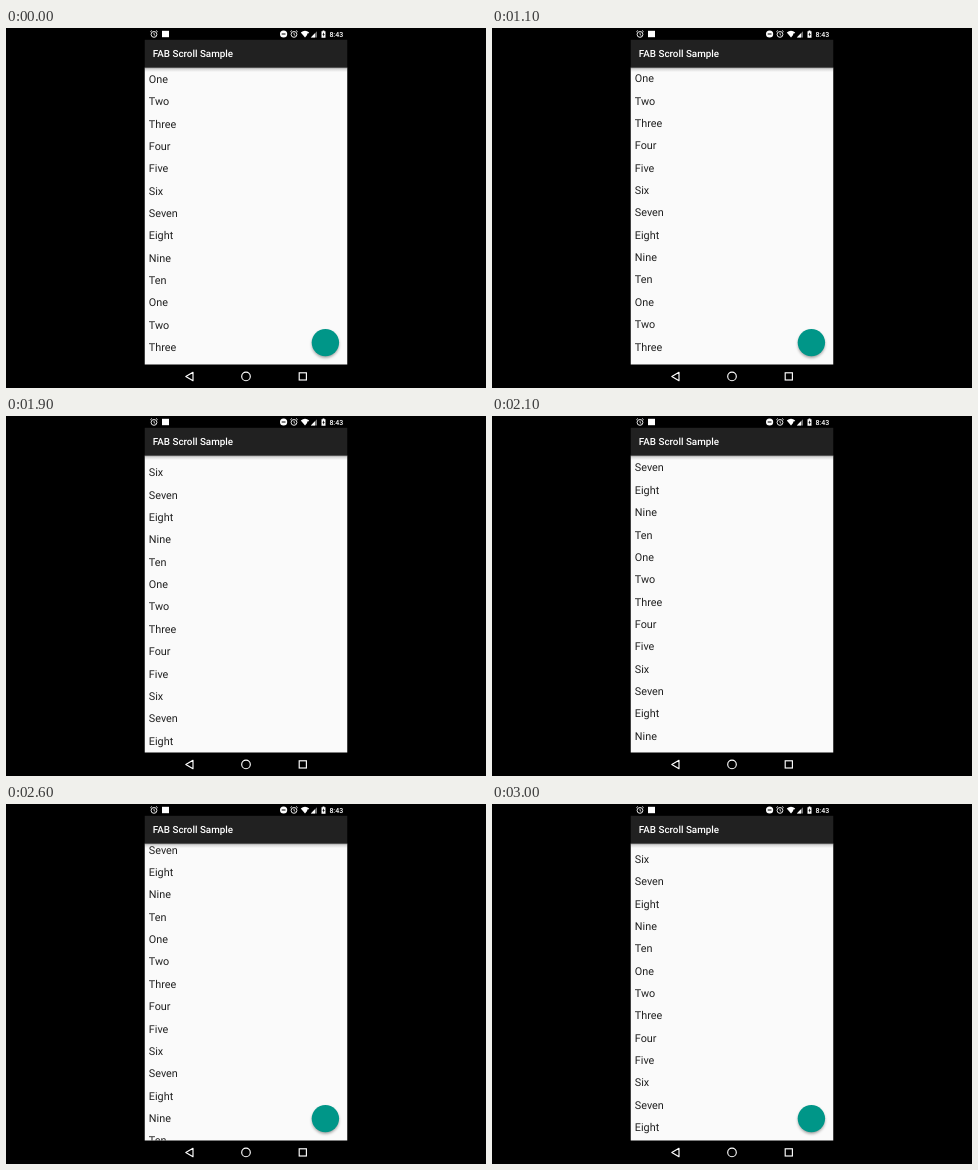
An HTML page for the animation above (3.1 s loop, 480 by 360 pixels).

```html
<!DOCTYPE html>
<html lang="en">
<head>
<meta charset="utf-8">
<title>FAB Scroll Sample</title>
<style>
  html, body { margin: 0; width: 100%; height: 100%; overflow: hidden; background: #000; }
  svg { display: block; width: 480px; height: 360px; }
  text { font-family: Roboto, sans-serif; text-rendering: geometricPrecision; }
  .bar { font-weight: 500; fill: #fff; }
  #rows { font-size: 10.83px; fill: #212121; }
  .line { fill: none; stroke: #fff; }
</style>
</head>
<body>
<svg viewBox="0 0 480 360">
  <defs>
    <clipPath id="view"><rect x="138.75" y="39.4" width="202.5" height="297"/></clipPath>
    <linearGradient id="shade" x2="0" y2="1">
      <stop offset="0" stop-opacity=".36"/>
      <stop offset=".4" stop-opacity=".13"/>
      <stop offset="1" stop-opacity="0"/>
    </linearGradient>
    <filter id="soft" x="-50%" y="-50%" width="200%" height="200%">
      <feGaussianBlur stdDeviation="1.7"/>
    </filter>
    <g id="alarm" class="line">
      <circle cy=".4" r="2.9" stroke-width=".9"/>
      <path d="M0 -1.2V.6L1.3 1.4M-3.7 -2.2L-2 -3.6M3.7 -2.2L2 -3.6" stroke-width=".8"/>
    </g>
  </defs>
  <rect width="480" height="360"/>
  <g clip-path="url(#view)">
    <rect x="138" y="39" width="204" height="298" fill="#fafafa"/>
    <g id="rows"></g>
    <rect x="138" y="39.4" width="204" height="4.6" fill="url(#shade)"/>
    <g id="fab">
      <circle cy="1.8" r="13.3" fill-opacity=".38" filter="url(#soft)"/>
      <circle r="13.7" fill="#009688"/>
    </g>
  </g>
  <rect x="138.75" y="11.8" width="202.5" height="27.6" fill="#212121"/>
  <text class="bar" x="146.8" y="29.2" font-size="9.84">FAB Scroll Sample</text>

  <use href="#alarm" x="148" y="6"/>
  <rect x="156" y="2.8" width="7" height="6.4" fill="#fff"/>
  <circle cx="277.6" cy="6" r="3.6" fill="#fff"/>
  <path d="M275.7 6h3.8" class="line" stroke="#000" style="stroke:#000"/>
  <use href="#alarm" x="288" y="6"/>
  <path d="M294.8 4.4Q299 1.2 303.2 4.4L299 9.6Z" fill="#fff"/>
  <path d="M301.9 5.6v4" style="stroke:#000" stroke-width="1.2"/>
  <path d="M304.8 9.4L311 3.2V9.4Z" fill="#777"/>
  <path d="M304.8 9.4L309 5.2V9.4Z" fill="#fff"/>
  <path d="M315.5 3.2h1.1v-.8h1.8v.8h1.1v6.6h-4Z" fill="#fff"/>
  <path d="M317.9 4.2L316.4 6.7H317.3V8.8L318.7 6.1H317.9Z"/>
  <text class="bar" x="323.4" y="8.6" font-size="7">8:43</text>

  <g class="line" stroke-width="1.15">
    <path d="M187 344.3V352.7L179.8 348.5Z" stroke-linejoin="round"/>
    <circle cx="240" cy="348.4" r="4.3"/>
    <rect x="293.2" y="344.8" width="7.2" height="7.2"/>
  </g>
</svg>
<script>
const LOOP = 3100, STEP = 100, PITCH = 22.36;
const names = "One Two Three Four Five Six Seven Eight Nine Ten".split(" ");
const rows = document.getElementById("rows");
const fab = document.getElementById("fab");

for (let i = 0; i < 21; i++) {
  const row = document.createElementNS(rows.namespaceURI, "text");
  row.setAttribute("x", 142.8);
  row.setAttribute("y", 54.8 + i * PITCH);
  row.textContent = names[i % names.length];
  rows.append(row);
}

// List offset for each step from 1100 ms on
const DRAG_START = 1100;
const drag = [.6, .6, 2.5, 9, 20.4, 38, 61, 85, 106.3, 122, 133.5, 141,
  145.4, 146, 143.5, 139.3, 132.5, 124.5, 116, 107.8];

// [time, scale, opacity] of the button
const fabSteps = [[0, 1, 1], [1400, .85, .88], [1500, .22, .3], [1600, 0, 0],
  [2500, .4, .45], [2600, 1, 1]];

function draw(time) {
  const t = Math.floor(time / STEP) * STEP;
  const y = t < DRAG_START ? 0 : drag[(t - DRAG_START) / STEP];
  const [, scale, alpha] = fabSteps.findLast(s => s[0] <= t);
  rows.setAttribute("transform", `translate(0 ${-y})`);
  fab.setAttribute("transform", `translate(319.4 314.6) scale(${scale})`);
  fab.setAttribute("opacity", alpha);
}

const start = performance.now();
function tick() {
  draw((performance.now() - start) % LOOP);
  requestAnimationFrame(tick);
}
tick();
</script>
</body>
</html>
```
